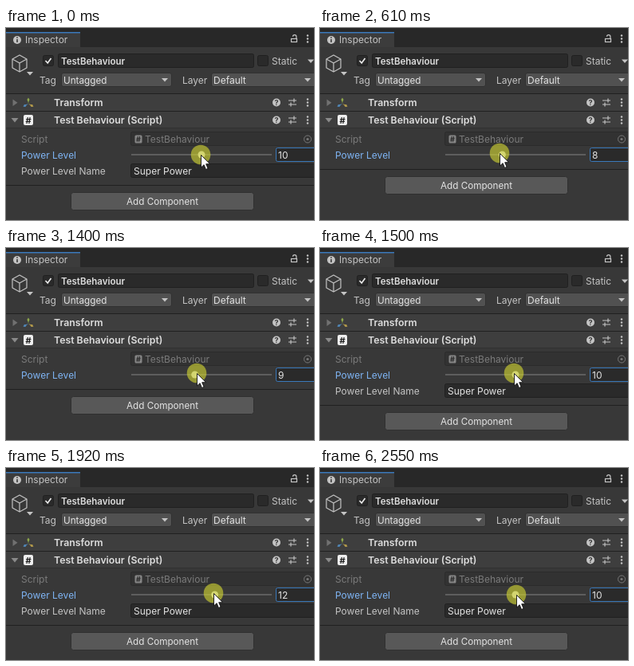
These frames come from a looping animation (386 by 241 pixels, 2580 ms). An HTML page:

```html
<!DOCTYPE html>
<html lang="en">
<head>
<meta charset="utf-8">
<title>Inspector</title>
<style>
  html, body { margin: 0; width: 100%; height: 100%; overflow: hidden; background: #383838; }
  svg { display: block; width: 386px; height: 241px; }
  text { font: 12px Inter, sans-serif; fill: #c4c4c4; }
  .bold { font-weight: 600; font-size: 12.3px; fill: #dedede; }
  .dim { fill: #7b7b7b; }
  .active { fill: #7fb5f5; }
  .value { fill: #e4e4e4; }
  .field { fill: #2a2a2a; stroke: #202020; }
  .popup { fill: #515151; stroke: #303030; }
  .line { fill: none; stroke: #c4c4c4; stroke-width: 1.2; }
  .rule { fill: #202020; }
</style>
</head>
<body>
<svg viewBox="0 0 386 241">
  <defs>
    <path id="arrow" d="M-4-2H4L0 2.5Z" fill="#c4c4c4"/>
    <g id="kebab" fill="#c4c4c4">
      <circle cy="-4" r="1.2"/><circle r="1.2"/><circle cy="4" r="1.2"/>
    </g>
    <g id="tools">
      <circle cx="339" r="5" fill="#c4c4c4"/>
      <text x="339" y="3.4" text-anchor="middle" style="font-size:9px;font-weight:700;fill:#383838">?</text>
      <path class="line" d="M354-2.5H364M354 2.5H364M361-5V0M357 0V5"/>
      <use href="#kebab" x="378"/>
    </g>
    <path id="petal" d="M0 0L-.6-3L-1.6-5L0-7.5L1.6-5L.6-3Z"/>
  </defs>

  <rect width="386" height="241" fill="#383838"/>
  <rect width="386" height="24" fill="#282828"/>
  <rect y="5" width="93" height="19" fill="#3c3c3c"/>
  <rect y="5" width="93" height="1.5" fill="#3a79bb"/>
  <circle cx="14" cy="15" r="5" fill="#c4c4c4"/>
  <path d="M14 14V18M14 11.2V12.8" stroke="#383838" stroke-width="1.6"/>
  <text x="24" y="19">Inspector</text>
  <rect x="357.5" y="13.5" width="7" height="4" class="line"/>
  <path d="M359.5 10.8a2.2 2.2 0 0 1 4.4 0V13" class="line"/>
  <use href="#kebab" x="378" y="13.5"/>

  <path d="M17 34L26 39V50L17 55L8 50V39ZM8 39L17 44L26 39M17 44V55" class="line" stroke-linejoin="round"/>
  <use href="#arrow" x="30" y="57"/>
  <rect x="46.5" y="34.5" width="13" height="13" rx="2" class="field"/>
  <path d="M49.5 41L52.2 44L56.5 38" class="line" style="stroke:#eee;stroke-width:1.6"/>
  <rect x="65.5" y="32.5" width="245" height="17" rx="2" class="field"/>
  <text x="69" y="45.5" class="bold" style="font-size:11.5px">TestBehaviour</text>
  <rect x="315.5" y="34.5" width="13" height="13" rx="2" class="field"/>
  <text x="333" y="45.5">Static</text>
  <use href="#arrow" x="382" y="41.5"/>
  <text x="42" y="69.5">Tag</text>
  <rect x="69.5" y="56.5" width="138" height="17" rx="2.5" class="popup"/>
  <text x="72" y="69.5" class="value" style="font-size:11.7px">Untagged</text>
  <use href="#arrow" x="199" y="65"/>
  <text x="221" y="69.5">Layer</text>
  <rect x="257.5" y="56.5" width="135" height="17" rx="2.5" class="popup"/>
  <text x="260" y="69.5" class="value">Default</text>
  <use href="#arrow" x="378" y="65"/>

  <rect y="82" width="386" height="43" fill="#3e3e3e"/>
  <rect y="82" width="386" height="1" class="rule"/>
  <rect y="104" width="386" height="1" class="rule"/>
  <rect y="125" width="386" height="1" fill="#303030"/>
  <path d="M8.5 89.5L14.5 93.7L8.5 98Z" fill="#717171"/>
  <path d="M6.5 113H15.5L11 118.5Z" fill="#8a8a8a"/>
  <g transform="translate(28 95)">
    <use href="#petal" fill="#8fa94c"/>
    <use href="#petal" transform="rotate(-120)" fill="#5085b5"/>
    <use href="#petal" transform="rotate(120)" fill="#b0984a"/>
  </g>
  <rect x="22" y="109" width="12" height="13" rx="2" fill="#eee"/>
  <text x="28" y="119.5" text-anchor="middle" style="font-size:11px;font-weight:700;fill:#222">#</text>
  <text x="60" y="98" class="bold">Transform</text>
  <text x="60" y="120" class="bold">Test Behaviour (Script)</text>
  <use href="#tools" y="93.5"/>
  <use href="#tools" y="115.5"/>

  <text x="19" y="144" class="dim">Script</text>
  <rect x="156.5" y="130.5" width="236" height="17" rx="2" fill="#323232" stroke="#2b2b2b"/>
  <rect x="161.5" y="134.5" width="9" height="10" rx="1.5" fill="#858585"/>
  <text x="166" y="143" text-anchor="middle" style="font-size:9px;font-weight:700;fill:#282828">#</text>
  <text x="174" y="144" class="dim">TestBehaviour</text>
  <circle cx="378" cy="139.5" r="4.5" fill="none" stroke="#787878"/>
  <circle cx="378" cy="139.5" r="1.6" fill="#787878"/>

  <text x="19" y="164" class="active">Power Level</text>
  <rect x="157" y="158" width="176" height="2" fill="#5e5e5e"/>
  <rect x="338.5" y="150.5" width="54" height="17" rx="2" fill="#2a2a2a" stroke="#3a79bb"/>
  <text x="341" y="164" class="value" id="level"></text>

  <g id="nameRow">
    <text x="19" y="184">Power Level Name</text>
    <rect x="156.5" y="170.5" width="236" height="17" rx="2" class="field"/>
    <text x="160" y="184" class="value">Super Power</text>
  </g>
  <g id="footer">
    <rect y="197" width="386" height="1" class="rule"/>
    <rect x="81.5" y="206.5" width="229" height="22" rx="3" fill="#585858" stroke="#303030"/>
    <text x="196" y="221.5" text-anchor="middle" class="value" style="font-size:11.7px">Add Component</text>
  </g>

  <circle id="knob" cy="159" r="4.5" fill="#e6e6e6"/>
  <circle id="halo" r="12.3" fill="#c8cc32" fill-opacity=".66"/>
  <path id="pointer" d="M0 0V15.5L3.6 12.2L6 18L8.6 16.9L6.2 11.2H11Z" fill="#fff" stroke="#111" stroke-width=".9"/>
</svg>
<script>
  const LOOP = 2580;
  // time, pointer x, pointer y
  const path = [
    [0, 244, 159], [120, 244, 159], [340, 236, 157], [610, 225, 157],
    [1190, 225, 157], [1400, 239, 157], [1680, 250, 157], [1720, 250, 157],
    [1920, 260, 157], [2110, 264, 158], [2400, 264, 158], [2550, 246, 159],
    [LOOP, 246, 159]
  ];
  const el = id => document.getElementById(id);
  const [level, nameRow, footer, halo, knob, pointer] =
    ['level', 'nameRow', 'footer', 'halo', 'knob', 'pointer'].map(el);
  const SLIDER_LEFT = 162, SLIDER_STEP = 8.3;

  function pointerAt(t) {
    const i = path.findIndex(p => p[0] > t);
    const [a, b] = [path[i - 1], path[i]];
    const k = (t - a[0]) / (b[0] - a[0]);
    return [1, 2].map(n => Math.round(a[n] + (b[n] - a[n]) * k));
  }

  function draw(now) {
    const [x, y] = pointerAt(now % LOOP);
    const value = Math.round((x - SLIDER_LEFT) / SLIDER_STEP);
    const named = value >= 10;
    level.textContent = value;
    nameRow.style.display = named ? '' : 'none';
    footer.setAttribute('transform', `translate(0 ${named ? 0 : -20})`);
    knob.setAttribute('cx', SLIDER_LEFT + value * SLIDER_STEP);
    halo.setAttribute('transform', `translate(${x} ${y})`);
    pointer.setAttribute('transform', `translate(${x + .5} ${y + .5})`);
  }

  const start = performance.now();
  (function tick() {
    draw(performance.now() - start);
    requestAnimationFrame(tick);
  })();
</script>
</body>
</html>
```
